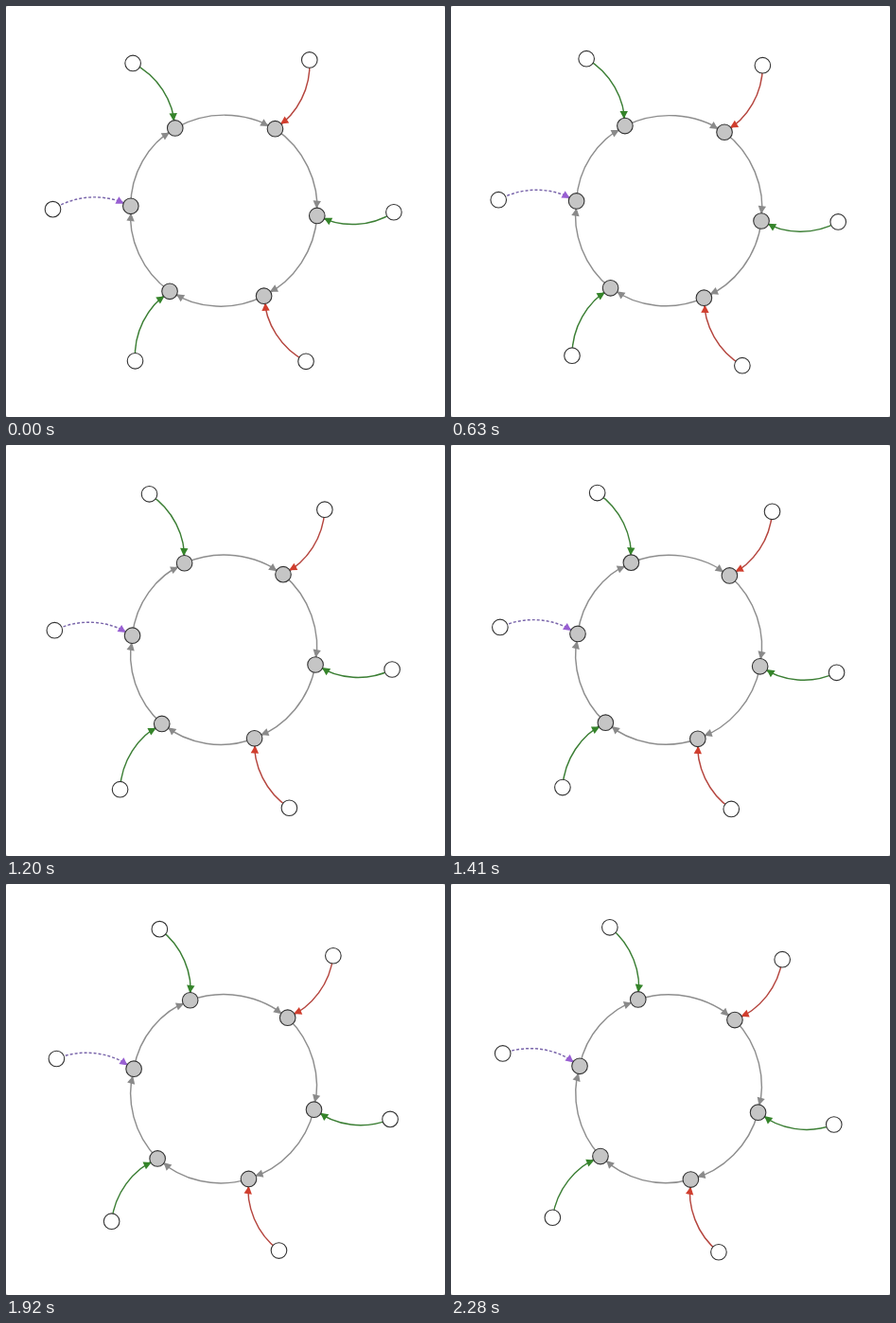
These frames come from a looping animation (464 px wide and 434 px high, 2.31 s). An HTML page with a canvas:

```html
<!DOCTYPE html>
<html lang="en">
<head>
<meta charset="utf-8">
<title>Rotating graph</title>
<style>
  html, body { margin: 0; width: 100%; height: 100%; overflow: hidden; background: #aaa; }
  canvas { display: block; background: #fff; border-radius: 2px; }
</style>
</head>
<body>
<canvas width="464" height="434"></canvas>
<script>
const ctx = document.querySelector('canvas').getContext('2d');
const LOOP = 2310, STEP = 30;
const CENTER = { x: 228.3, y: 216.5 };
const TURN = 11.6;   // degrees per loop
const SHRINK = 1.2;  // pixels per loop
const NODE_RADIUS = 8.3;

const gray = { line: '#8e8e8e', head: '#8a8a8a' };
const green = { line: '#3c7f35', head: '#35842a' };
const red = { line: '#b5463f', head: '#d03e2e' };
const purple = { line: '#7a66ab', head: '#985fd2', dash: [3, 2] };

// Six branches, 60 degrees apart; inner and outer hold [radius, angle within the sector] at mid-loop.
const branches = [
  { style: green, inner: [100, -113.7], outer: [181.7, -115.3] },
  { style: red, inner: [102.8, -111.3], outer: [183.8, -114.1] },
  { style: green, inner: [100, -111.4], outer: [181, -113.8] },
  { style: red, inner: [99.4, -110.5], outer: [181.3, -113.4] },
  { style: green, inner: [100.6, -111.1], outer: [182.4, -114.1] },
  { style: purple, inner: [96, -111.1], outer: [178.2, -113.6] }
];

// The whole graph turns steadily about its center; phase runs from -0.5 to 0.5.
function place([radius, angle], sector, phase) {
  const r = radius - SHRINK * phase;
  const a = (angle + 60 * sector + TURN * phase) * Math.PI / 180;
  return [CENTER.x + r * Math.cos(a), CENTER.y + r * Math.sin(a)];
}

// A 60 degree clockwise arc: its radius equals its chord.
function drawEdge([x1, y1], [x2, y2], { line, head, dash = [] }) {
  const dx = x2 - x1, dy = y2 - y1, r = Math.hypot(dx, dy);
  ctx.strokeStyle = line;
  ctx.lineWidth = 1.45;
  ctx.setLineDash(dash);
  ctx.stroke(new Path2D(`M${x1} ${y1}A${r} ${r} 0 0 1 ${x2} ${y2}`));

  ctx.save();
  ctx.translate(x2, y2);
  ctx.rotate(Math.atan2(dy, dx) + Math.PI / 6);
  ctx.fillStyle = head;
  ctx.fill(new Path2D('M-7.5 1.2L-15.7 -3V5.4Z'));
  ctx.restore();
}

function drawNode([x, y], fill) {
  ctx.beginPath();
  ctx.arc(x, y, NODE_RADIUS, 0, 2 * Math.PI);
  ctx.fillStyle = fill;
  ctx.fill();
  ctx.strokeStyle = '#333';
  ctx.lineWidth = 1.1;
  ctx.setLineDash([]);
  ctx.stroke();
}

function draw(now) {
  const t = Math.floor(now % LOOP / STEP) * STEP;
  const phase = t / (LOOP - STEP) - 0.5;
  const inner = branches.map((b, i) => place(b.inner, i, phase));
  const outer = branches.map((b, i) => place(b.outer, i, phase));

  ctx.clearRect(0, 0, 464, 434);
  branches.forEach(({ style }, i) => {
    drawEdge(inner[i], inner[(i + 1) % inner.length], gray);
    drawEdge(outer[i], inner[i], style);
  });
  inner.forEach(p => drawNode(p, '#c5c5c5'));
  outer.forEach(p => drawNode(p, '#fff'));
}

let start;
function tick(now) {
  start ??= now;
  draw(now - start);
  requestAnimationFrame(tick);
}
requestAnimationFrame(tick);
</script>
</body>
</html>
```
